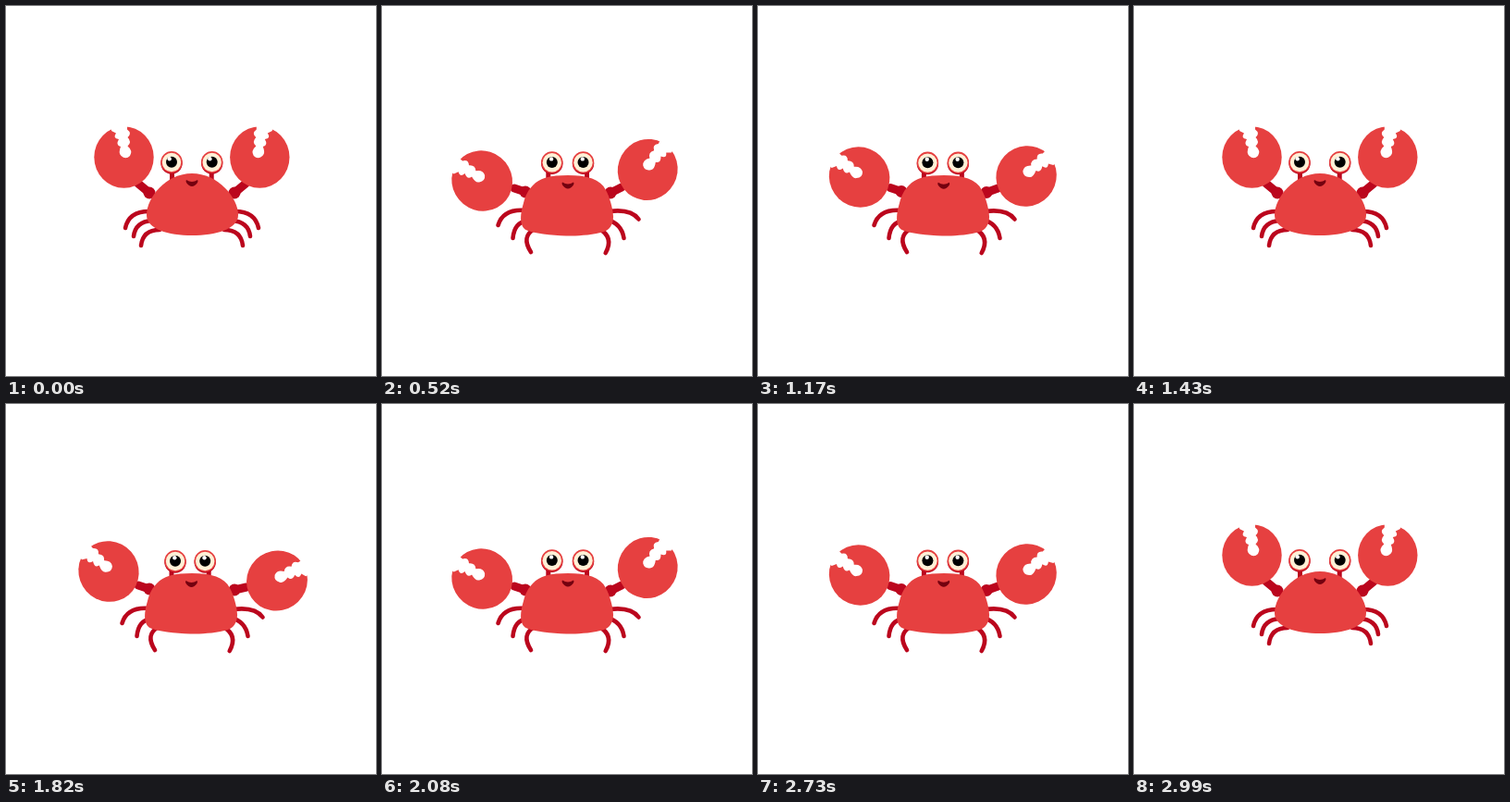
An HTML page for the animation above (3.12 s loop, 400 by 400 pixels).

```html
<!DOCTYPE html>
<html>
<head>
<meta charset="utf-8">
<title>Waving crab</title>
<style>
  html, body { margin: 0; height: 100%; overflow: hidden; background: #fff; }
  svg { display: block; width: 100%; height: 100%; }
</style>
</head>
<body>
<svg id="stage" viewBox="0 0 400 400"></svg>
<script>
const STEP = 130, RED = '#e64040', DARK = '#bb061d';
const stage = document.getElementById('stage');

// claws: x, y, turn; arms: outer end, then shoulder; eyes: left x, right x, y
// spread: how far the stalks stand outside the eyes; glint: highlight offset
const rest = {
  body: 'M201 181C229 181 251 207 251 226C251 241 227 248 201 248C175 248 152 241 152 226C152 207 173 181 201 181Z',
  legs: 'M157 222Q133 221 129 240M158 232Q140 233 138 249M166 242Q148 242 146 259' +
        'M245 222Q269 221 273 240M244 232Q262 233 264 249M236 242Q254 242 256 259',
  claws: [[127.5, 163.5, 0], [274.3, 163.5, 0]],
  arms: [[143, 192, 155, 202], [259, 192, 247, 202]],
  eyes: [179, 222.7, 169], spread: -.5, glint: -2.3, mouth: [201, 188]
};
const waveLow = {
  body: 'M201 183C222 183 236 187 242 199C246 206 250 220 250 228C250 236 246 242 240 244C230 247 215 248.5 205 248.5C190 248.5 170 247 158 243C148 240 149 226 153 213C155 205 158 199 163 194C170 186 182 183 201 183Z',
  legs: 'M155 221Q131 219 125.5 237M157 232Q143 234 141.5 251M165 241Q150 249 161 266' +
        'M246 222Q269 219 277.5 230.5M243 231Q259 235 261.5 251M235 241Q251 250 241.7 267',
  claws: [[108.2, 189, -51], [287.2, 177, 29]],
  arms: [[143, 197, 155, 201], [259, 196, 247, 202]],
  eyes: [183.8, 217.5, 169.2], spread: 4, glint: -.7, mouth: [201, 190.5]
};
const waveHigh = {
  ...waveLow,
  claws: [[111, 181, -41], [293, 191, 56]],
  arms: [[143, 196, 155, 200], [260, 198, 247, 201]],
  eyes: [183, 215.2, 170], mouth: [200.5, 191]
};

const mix = (a, b) => Array.isArray(a) ? a.map((v, i) => mix(v, b[i])) : (a + b) / 2;
const waveMid = { ...waveLow };
for (const key of ['claws', 'arms', 'eyes', 'mouth']) waveMid[key] = mix(waveLow[key], waveHigh[key]);

const cycle = [rest, waveLow, waveHigh, waveMid, waveLow, rest];

const circle = (x, y, r, fill) => `<circle cx="${x}" cy="${y}" r="${r}" fill="${fill}"/>`;
const line = (d, width) =>
  `<path d="${d}" fill="none" stroke="${DARK}" stroke-width="${width}" stroke-linecap="round"/>`;

const arm = ([x, y, sx, sy]) => line(`M${x} ${y}L${sx} ${sy}`, 9) + circle(sx, sy, 6.5, DARK);

const claw = ([x, y, turn], i) =>
  `<g transform="translate(${x} ${y}) rotate(${turn}) scale(${i ? -1 : 1} 1)">
    <ellipse rx="32.2" ry="33.3" fill="${RED}"/>
    <path fill="#fff" d="M-14 -37L-13.5 -28.5L-8.5 -26Q-12.5 -20.5 -5.5 -19.5Q-9.5 -13 -3.5 -11.5Q-6.5 -4 -3 -1.5Q2 3 6.5 -1.5Q10 -7 4 -12Q9 -16.5 4 -21.5Q9 -26 3.5 -30L3.5 -37Z"/>
  </g>`;

const stalk = (x, y) => line(`M${x} ${y + 9}V${y + 20}`, 5);
const eye = (x, y, glint) =>
  circle(x, y + 1, 11.7, DARK) + circle(x, y - .3, 11.7, RED) + circle(x, y, 10.2, '#fff0d6') +
  circle(x, y - .3, 6, '#000') + circle(x + glint, y - 3.8, 2.2, '#fff');

function draw({ body, legs, claws, arms, eyes: [left, right, y], spread, glint, mouth }) {
  stage.innerHTML = line(legs, 4.6) + arms.map(arm).join('') + claws.map(claw).join('') +
    stalk(left - spread, y) + stalk(right + spread, y) +
    `<path d="${body}" fill="${RED}"/>` + eye(left, y, glint) + eye(right, y, glint) +
    `<path transform="translate(${mouth})" fill="#74000f" d="M-6 0Q0 4 6 0Q7 1 6 3Q3 7 0 7Q-3 7 -6 3Q-7 1 -6 0Z"/>`;
}

let shown;
const start = performance.now();
function tick() {
  const pose = cycle[Math.floor((performance.now() - start) / STEP) % cycle.length];
  if (pose !== shown) draw(shown = pose);
  requestAnimationFrame(tick);
}
tick();
</script>
</body>
</html>
```
